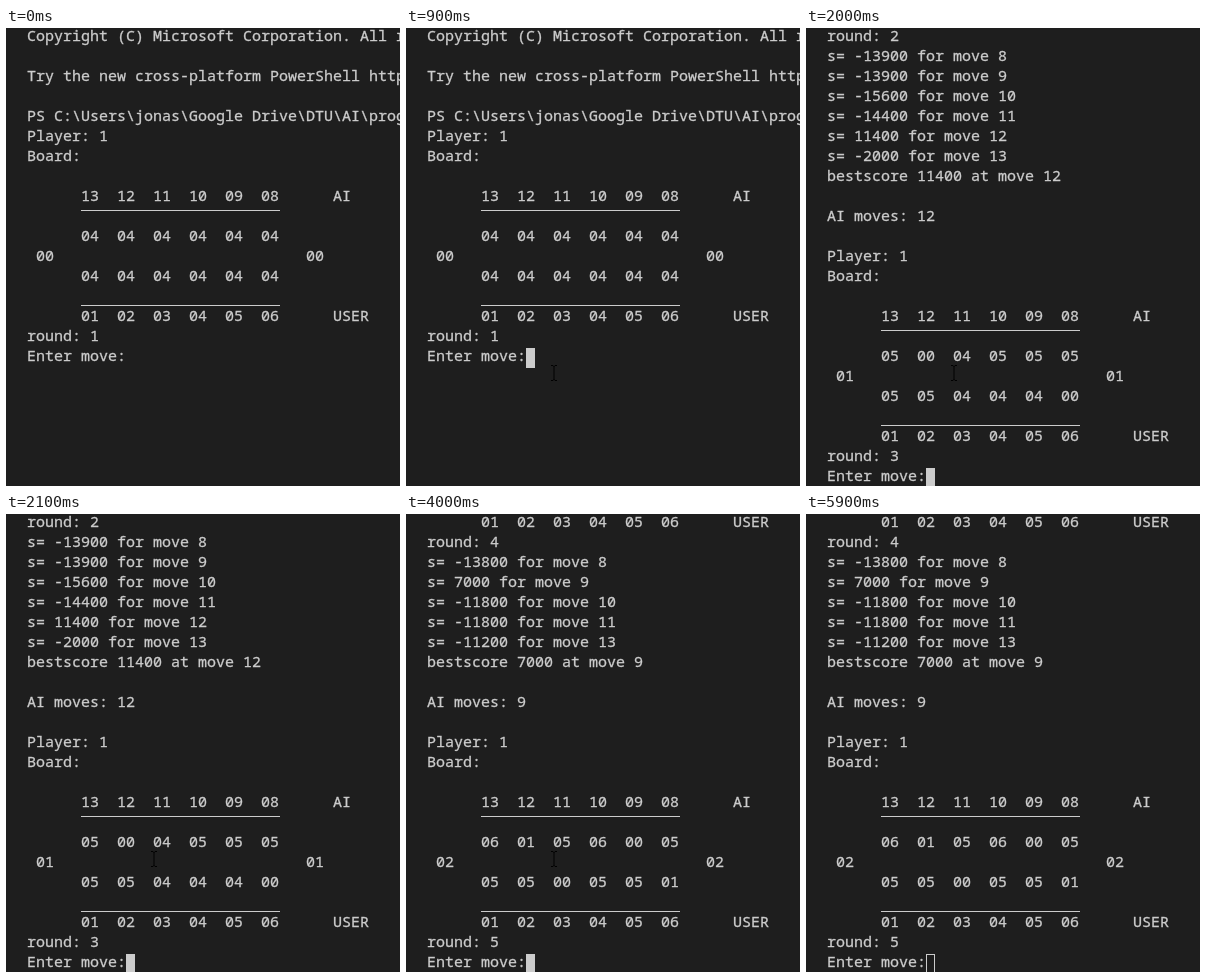
An HTML page for the animation above (6 s loop, 394 by 458 pixels).

```html
<!DOCTYPE html>
<html lang="en">
<head>
<meta charset="utf-8">
<title>Board game in a terminal</title>
<style>
html, body { margin: 0; width: 100%; height: 100%; overflow: hidden; background: #1e1e1e; }
#stage { position: relative; width: 394px; height: 458px; overflow: hidden; }
#stage > * { position: absolute; }
pre { margin: 0; left: 21px; top: -3px; color: #ccc; font: 15px/20px "Noto Sans Mono", "DejaVu Sans Mono", monospace; -webkit-text-stroke: .3px #ccc; }
.rule { left: 75px; width: 199px; height: 1px; background: #ccc; }
#cursor { width: 9px; height: 20px; box-sizing: border-box; border: 1px solid #ccc; }
#pointer { left: 0; top: 0; }
</style>
</head>
<body>
<div id="stage">
  <pre id="text"></pre>
  <div class="rule"></div>
  <div class="rule"></div>
  <div id="cursor"></div>
  <svg id="pointer" width="8" height="16" fill="none" stroke="#000"><path d="M1 .5H3L4 1.5L5 .5H7M4 1V15M1 15.5H3L4 14.5L5 15.5H7"/></svg>
</div>
<script>
const LOOP = 6000, ROW = 20, COL = 9, LEFT = 21;
const $ = id => document.getElementById(id);
const rules = document.querySelectorAll('.rule');

const pits = list => ' '.repeat(6) + list.split(' ').map(n => n.padStart(2, '0')).join('  ');
const USER_ROW = pits('1 2 3 4 5 6') + ' '.repeat(6) + 'USER';

function board(top, bottom, store, round) {
  return ['Player: 1', 'Board:', '',
    pits('13 12 11 10 9 8') + ' '.repeat(6) + 'AI', '',
    pits(top), ' ' + store + ' '.repeat(28) + store, pits(bottom), '',
    USER_ROW, 'round: ' + round, 'Enter move:'];
}

function search(round, scores, best) {
  return ['round: ' + round,
    ...Object.entries(scores).map(([move, s]) => `s= ${s} for move ${move}`),
    `bestscore ${scores[best]} at move ${best}`, '', 'AI moves: ' + best, ''];
}

// Each scene starts at a time and receives one typed digit
const scenes = [
  { at: 0, typeAt: 1600, key: '6', lines: [
    'Copyright (C) Microsoft Corporation. All rights reserved.', '',
    'Try the new cross-platform PowerShell https://aka.ms/pscore6', '',
    'PS C:\\Users\\jonas\\Google Drive\\DTU\\AI\\programs>',
    ...board('4 4 4 4 4 4', '4 4 4 4 4 4', '00', 1)] },
  { at: 2000, typeAt: 3100, key: '3', lines: [
    ...search(2, { 8: -13900, 9: -13900, 10: -15600, 11: -14400, 12: 11400, 13: -2000 }, 12),
    ...board('5 0 4 5 5 5', '5 5 4 4 4 0', '01', 3)] },
  { at: 4000, typeAt: LOOP, key: '', lines: [
    USER_ROW,
    ...search(4, { 8: -13800, 9: 7000, 10: -11800, 11: -11800, 13: -11200 }, 9),
    ...board('6 1 5 6 0 5', '5 5 0 5 5 1', '02', 5)] }
];

// Pointer path: time, x, y
const path = [[100, 390, 404], [300, 280, 396], [500, 225, 360], [700, 148, 345]];

function pointerAt(t) {
  const i = path.findIndex(p => p[0] > t);
  if (i < 0) return path[path.length - 1].slice(1);
  if (i === 0) return [-20, -20];
  const [t0, x0, y0] = path[i - 1], [t1, x1, y1] = path[i];
  const k = (t - t0) / (t1 - t0);
  return [x0 + (x1 - x0) * k, y0 + (y1 - y0) * k];
}

function draw(t) {
  const scene = scenes.filter(s => s.at <= t).pop();
  const typed = t >= scene.typeAt ? scene.key : '';
  const text = scene.lines.join('\n') + typed;
  if ($('text').textContent !== text) $('text').textContent = text;

  const last = scene.lines.length - 1;
  const header = (last - 8) * ROW;
  rules[0].style.top = header + 22 + 'px';
  rules[1].style.top = header + 117 + 'px';

  const cursor = $('cursor').style;
  cursor.left = LEFT + (11 + typed.length) * COL + 'px';
  cursor.top = last * ROW + 'px';
  cursor.visibility = t < 800 ? 'hidden' : 'visible';
  cursor.background = t < 5900 ? '#ccc' : 'none';

  const [x, y] = pointerAt(t).map(Math.round);
  $('pointer').style.transform = `translate(${x - 4}px, ${y - 8}px)`;
  $('pointer').style.visibility = t < 5900 ? 'visible' : 'hidden';
}

const start = performance.now();
function tick() {
  draw((performance.now() - start) % LOOP);
  requestAnimationFrame(tick);
}
tick();
</script>
</body>
</html>
```
